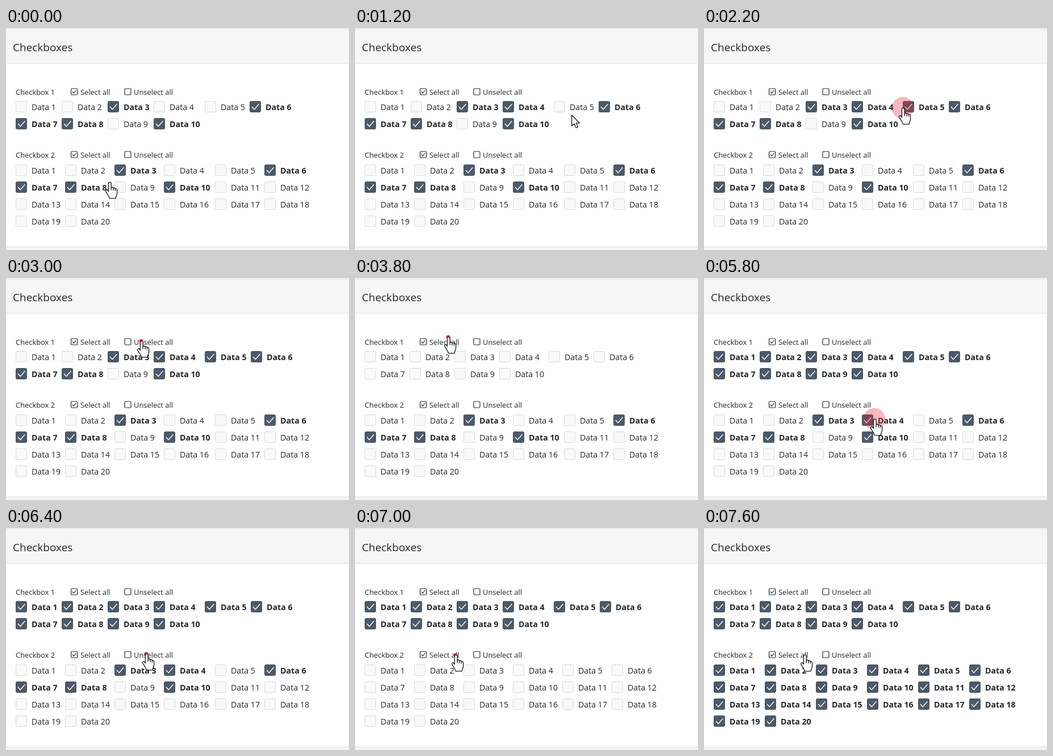
These frames come from a looping animation (604x392 px, 8.2 s). An HTML page:

```html
<!DOCTYPE html>
<html lang="en">
<head>
<meta charset="utf-8">
<title>Checkboxes</title>
<style>
  html, body { margin: 0; width: 100%; height: 100%; overflow: hidden; background: #fff; }
  svg { display: block; width: 604px; height: 392px; }
  text { font: 14.2px "Open Sans", "Noto Sans", sans-serif; fill: #212529; }
  .title { font-size: 19px; }
  .small { font-size: 12.9px; }
  .icon { fill: none; stroke: #212529; stroke-width: 1.2; }
  .box { fill: #f9f9f9; stroke: #d8dadc; }
  .tick { fill: none; stroke: #fff; stroke-width: 1.4; visibility: hidden; }
  .on .box { fill: #4b5a69; stroke: #46545f; }
  .on .tick { visibility: visible; }
  .on text { font-weight: 700; }
  .cursor { fill: #fff; stroke: #14141c; stroke-width: 1.3; stroke-linejoin: round; }
</style>
</head>
<body>
<svg viewBox="0 0 604 392">
  <rect width="604" height="62" fill="#f6f6f6"/>
  <rect y="1" width="604" height="1" fill="#e0e0e0"/>
  <rect y="62" width="604" height="1" fill="#e2e2e2"/>
  <rect y="386" width="604" height="6" fill="#f4f4f4"/>
  <rect y="386" width="604" height="1" fill="#dedede"/>
  <text class="title" x="12" y="41">Checkboxes</text>
  <g id="groups"></g>
  <circle id="ring" fill="#e82032" stroke="#d83040" stroke-dasharray="5 2"/>
  <path id="arrow" class="cursor" d="M.6 .8V20L5 15.9L8.2 23.2L11.6 21.7L8.5 14.8H14.4Z"/>
  <g id="hand" class="cursor">
    <path d="M-2.6 2.6C-2.6-.6 2.2-.6 2.2 2.6V10C3 8.4 6 8.7 6 11C6.8 9.5 9.4 9.9 9.4 12.2C10.2 11 12.6 11.6 12.6 14V19.5C12.6 23.5 10.2 25 10.2 28.8H-.8C-.8 26-3 24-4.4 21.2L-7.2 16.6C-8.2 14-5.6 12.8-4 14.6L-2.6 16.6Z"/>
    <path fill="none" d="M2.2 10V14.6M6 11V15M9.4 12.2V15.4"/>
  </g>
</svg>
<script>
const LOOP = 8200, STEP = 200, RING_STEPS = 2;
const PRESET = [3, 6, 7, 8, 10];
const byId = id => document.getElementById(id);

function set(el, attrs) {
  for (const name in attrs) el.setAttribute(name, attrs[name]);
  return el;
}

function add(parent, tag, attrs, content = "") {
  const el = document.createElementNS("http://www.w3.org/2000/svg", tag);
  el.textContent = content;
  return set(parent.appendChild(el), attrs);
}

function makeGroup(name, count, headY, rowY) {
  const head = add(byId("groups"), "g", { transform: `translate(0 ${headY})` });
  const label = (x, s) => add(head, "text", { class: "small", x, y: 5 }, s);
  const square = x => add(head, "rect", { class: "icon", x, y: -6, width: 11, height: 11, rx: 1.5 });
  label(17, name);
  label(131, "Select all");
  label(225, "Unselect all");
  square(114.6);
  square(209);
  add(head, "path", { class: "icon", d: "M117 -.7L119.4 2L123.4 -3" });

  const items = Array.from({ length: count }, (_, i) => {
    const g = add(byId("groups"), "g");
    add(g, "rect", { class: "box", x: .5, y: .5, width: 19, height: 19, rx: 2 });
    add(g, "path", { class: "tick", d: "M4 10L8.2 14.6L16.4 5.2" });
    add(g, "text", { x: 28, y: 16 }, `Data ${i + 1}`);
    return g;
  });
  return { items, headY, rowY };
}

const groups = [
  makeGroup("Checkbox 1", 10, 113, 129),
  makeGroup("Checkbox 2", 20, 224, 241)
];

// Cursor route; a stop with a group is a press that sets one item or all of them.
const stop = (at, x, y, group, value) => ({ at, x, y, group, value, press: group !== undefined });
const route = [
  stop(0, 183, 272),
  stop(3, 270, 140, 0, 4),
  stop(6, 381, 153),
  stop(10, 351, 141, 0, 5),
  stop(15, 239, 111, 0, false),
  stop(19, 165, 104, 0, true),
  stop(23, 160, 159),
  stop(24, 185, 214),
  stop(28, 301, 249, 1, 4),
  stop(32, 248, 222, 1, false),
  stop(35, 178, 224, 1, true)
];

function isChecked(group, n, step) {
  return route
    .filter(s => s.group === group && s.at < step)
    .reduce((on, { value }) => typeof value === "boolean" ? value : on || value === n,
            PRESET.includes(n));
}

// Six columns, each as wide as its widest label.
function layout({ items, rowY }, group, step) {
  const widths = Array(6).fill(0);
  items.forEach((g, i) => {
    const on = isChecked(group, i + 1, step);
    g.setAttribute("class", on ? "on" : "");
    const width = i < 9 ? (on ? 81 : 79) : (on ? 90 : 87);
    widths[i % 6] = Math.max(widths[i % 6], width);
  });
  items.forEach((g, i) => {
    const x = widths.slice(0, i % 6).reduce((a, b) => a + b, 17);
    g.setAttribute("transform", `translate(${x} ${rowY + 30 * Math.floor(i / 6)})`);
  });
}

// The cursor rests while the ring of a press spreads, then eases to the next stop.
function cursorAt(step) {
  const i = route.findLastIndex(s => s.at <= step);
  const a = route[i], b = route[i + 1] || a;
  const leave = a.at + (a.press ? RING_STEPS : 0);
  const p = step > leave ? (step - leave) / (b.at - leave) : 0;
  const e = b === a ? 0 : p * p * (3 - 2 * p);
  return { x: a.x + (b.x - a.x) * e, y: a.y + (b.y - a.y) * e };
}

function isClickable({ x, y }) {
  return groups.some(({ items, headY, rowY }) => {
    const dy = y - rowY;
    const onLink = Math.abs(y - headY) < 11 && x > 113 && x < 296;
    const onRow = dy > 0 && dy < items.length / 6 * 30 + 20 && dy % 30 > 0 && dy % 30 < 20;
    return onLink || onRow;
  });
}

function drawCursor(step) {
  const pos = cursorAt(step);
  const shape = isClickable(pos) ? "hand" : "arrow";
  for (const id of ["arrow", "hand"]) {
    set(byId(id), {
      transform: `translate(${pos.x} ${pos.y})`,
      visibility: id === shape ? "visible" : "hidden"
    });
  }
}

function drawRing(step) {
  const press = route.find(s => s.press && step >= s.at && step <= s.at + RING_STEPS);
  const ring = set(byId("ring"), { visibility: press ? "visible" : "hidden" });
  if (!press) return;
  const age = step - press.at;
  const fade = Math.exp(-1.05 * age);
  set(ring, {
    cx: press.x - 1,
    cy: press.y,
    r: 3 + 21 * (1 - (1 - age / RING_STEPS) ** 2),
    "fill-opacity": .9 * fade,
    "stroke-opacity": fade
  });
}

let shown = -1;
function tick() {
  const step = Math.floor((performance.now() - start) % LOOP / STEP);
  if (step !== shown) {
    shown = step;
    groups.forEach((g, i) => layout(g, i, step));
    drawRing(step);
    drawCursor(step);
  }
  requestAnimationFrame(tick);
}
const start = performance.now();
tick();
</script>
</body>
</html>
```
